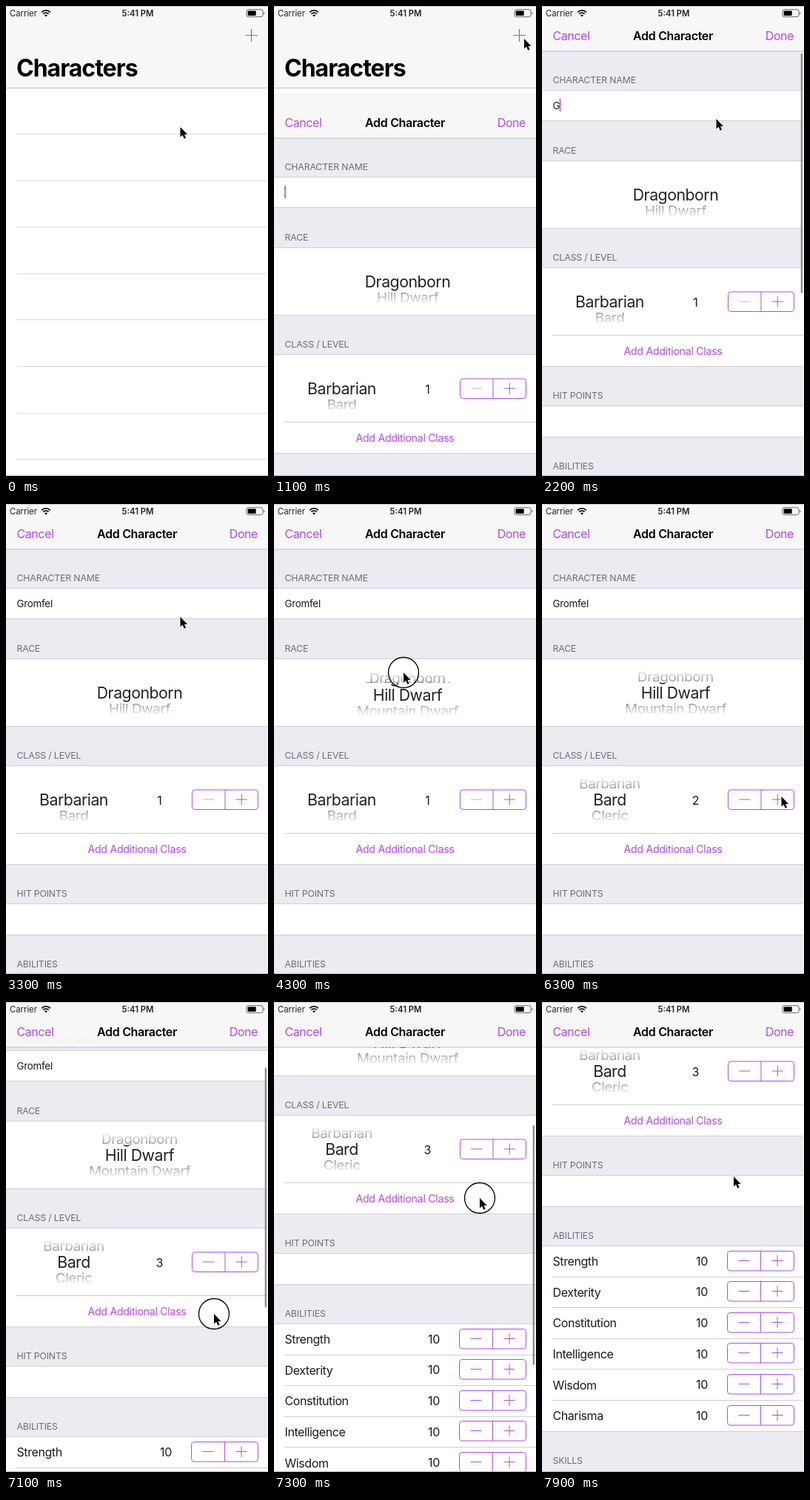
These frames come from a looping animation (354 by 633 pixels, 8 s). An HTML page:

```html
<!DOCTYPE html>
<html lang="en">
<head>
<meta charset="utf-8">
<title>Add Character</title>
<style>
  html, body { margin: 0; width: 100%; height: 100%; overflow: hidden; background: #fff; }
  svg { display: block; }
  text { font: 400 16px Inter, "Open Sans", sans-serif; letter-spacing: -.42px; fill: #1a1a1a; }
  text.status { font-size: 11.3px; letter-spacing: 0; fill: #222; }
  text.clock { font-weight: 600; }
  text.large { font-size: 32px; font-weight: 700; letter-spacing: -1px; fill: #000; }
  text.title { font-weight: 600; letter-spacing: -.33px; fill: #000; }
  text.action { fill: #b14ae6; }
  text.link { font-size: 14.2px; letter-spacing: -.29px; fill: #b14ae6; }
  text.head { font-size: 12.3px; letter-spacing: -.15px; fill: #6d6d72; }
  text.field { font-size: 13.3px; letter-spacing: -.2px; }
  text.wheel { font-size: 21.3px; letter-spacing: -.5px; fill: #222; }
  .tint { stroke: #b14ae6; fill: none; }
</style>
</head>
<body>
<script>
const W = 354, H = 633, LOOP = 8000, TICK = 100;
const NAME = 'Gromfel';

// Markup helpers
const rect = (x, y, w, h, fill, more = '') =>
  `<rect x="${x}" y="${y}" width="${w}" height="${h}" fill="${fill}" ${more}/>`;
const text = (x, y, str, cls = '', anchor = 'start', more = '') =>
  `<text x="${x}" y="${y}" class="${cls}" text-anchor="${anchor}" ${more}>${str}</text>`;
const line = (y, x = 0, color = '#d0d0d4') => rect(x, y, W - x, 1, color);
const band = (top, bottom) => rect(0, top, W, bottom - top, '#fff') + line(top) + line(bottom);
const header = (y, str) => text(14.5, y, str, 'head');

function stepper(x, cy, id = '') {
  const w = 340.5 - x, mid = x + w / 2, l = x + w / 4, r = x + w * 3 / 4;
  return `<g class="tint">
    <rect x="${x}" y="${cy - 13}" width="${w}" height="26.5" rx="3.8"/>
    <path d="M${mid} ${cy - 13}v26.5M${r - 7.5} ${cy}h15M${r} ${cy - 7.5}v15"/>
    <path ${id && `id="${id}"`} d="M${l - 7.5} ${cy}h15"/></g>`;
}

const fade = (id, from, to) =>
  `<linearGradient id="${id}" x1="0" x2="0" y1="${from}" y2="${to}">
    <stop stop-color="#fff" offset="0"/><stop stop-color="#fff" stop-opacity=".48" offset="1"/>
  </linearGradient>`;

// A wheel is a dimmed, foreshortened list with a sharp strip across its middle.
const STRIP = 13.5;
function wheel(id, cx, cy, items) {
  const rows = items.map(s => text(0, 7.7, s, 'wheel', 'middle')).join('');
  return `<g id="${id}" transform="translate(${cx} ${cy})">
    <g class="dim">${rows}</g>
    ${rect(-85, -45, 170, 45 - STRIP, 'url(#fadeTop)')}
    ${rect(-85, STRIP, 170, 45 - STRIP, 'url(#fadeBottom)')}
    ${rect(-85, -STRIP, 170, STRIP * 2, '#fff')}
    <g class="sharp" clip-path="url(#strip)">${rows}</g></g>`;
}

const abilities = ['Strength', 'Dexterity', 'Constitution', 'Intelligence', 'Wisdom', 'Charisma'];
const ROW = 41.6;

const listScreen = rect(0, 0, W, H, '#fff') + rect(0, 0, W, 110, '#f7f7f7') + line(110, 0, '#c4c4c6') +
  text(14, 95, 'Characters', 'large') +
  '<path class="tint" stroke-width="1.2" d="M323 39.5h17M331.5 31v17"/>' +
  Array.from({ length: 8 }, (_, i) => line(Math.round(172 + i * 62.6), 14, '#dcdcdc')).join('');

const form = band(113, 154) + band(208, 299) + band(352, 485) + band(538, 580) + band(633, 883) +
  header(104, 'CHARACTER NAME') + header(199, 'RACE') + header(343, 'CLASS / LEVEL') +
  header(529, 'HIT POINTS') + header(624, 'ABILITIES') + header(927, 'SKILLS') +
  text(14.5, 138.8, '', 'field', 'start', 'id="name"') +
  rect(14, 125, 1.6, 17, '#b14ae6', 'id="caret"') +
  wheel('race', 180.5, 254, ['Dragonborn', 'Hill Dwarf', 'Mountain Dwarf', 'High Elf']) +
  wheel('class', 91.5, 398.5, ['Barbarian', 'Bard', 'Cleric', 'Druid']) +
  text(207.3, 405, '1', '', 'middle', 'id="level"') + stepper(251.5, 398, 'minus') +
  line(443, 14) + text(177, 469.8, 'Add Additional Class', 'link', 'middle') +
  abilities.map((s, i) => {
    const y = 654.5 + i * ROW;
    return text(14.5, y + 5.6, s) + text(216, y + 5.3, '10', '', 'middle') +
      stepper(250.5, Math.round(y) - 1.5) + (i ? line(Math.round(633 + i * ROW), 14) : '');
  }).join('');

const sheet = rect(0, 0, W, H, '#ebebf1') + `<g id="form">${form}</g>` +
  rect(0, 0, W, 61, '#f7f7f7', 'fill-opacity=".975"') + line(60.5, 0, '#c0c0c2') +
  text(14.5, 45.5, 'Cancel', 'action') + text(177, 45.5, 'Add Character', 'title', 'middle') +
  text(340, 45.5, 'Done', 'action', 'end') +
  rect(349.7, 64, 2.3, 323, '#8a8a8e', 'rx="1.15" id="bar"');

const statusBar = text(5, 13.8, 'Carrier', 'status') + text(178, 13.8, '5:41 PM', 'status clock', 'middle') +
  `<g fill="none" stroke="#111" stroke-width="1.8">
    <path d="M48.2 8.4a8 8 0 0 1 11.6 0M50.3 10.7a5 5 0 0 1 7.4 0"/></g>
  <path d="M54 14.5l-2-2.1a2.9 2.9 0 0 1 4 0z" fill="#111"/>
  <rect x="325" y="4.8" width="22" height="9.8" rx="2.4" fill="none" stroke="#555" stroke-width=".9"/>` +
  rect(326.7, 6.5, 11, 6.4, '#000', 'rx=".8"') +
  '<path d="M348.3 8a2 2 0 0 1 0 3.6z" fill="#555"/>';

const pointer = `<g id="pointer">
  <circle id="touch" r="20.5" fill="#fff" fill-opacity=".2" stroke="#000" stroke-width="1.3"/>
  <path d="M0 0V13.6L3.1 10.7 5.3 15.7 7.6 14.7 5.5 9.9H9.6Z" stroke="#fff" stroke-width="1.6" paint-order="stroke"/></g>`;

document.body.innerHTML = `<svg width="${W}" height="${H}" viewBox="0 0 ${W} ${H}"><defs>
  <g>${fade('fadeTop', .42, 1)}${fade('fadeBottom', .58, 0)}</g>
  <clipPath id="strip"><rect x="-85" y="${-STRIP}" width="170" height="${STRIP * 2}"/></clipPath></defs>
  ${listScreen}<g id="sheet">${sheet}</g>${statusBar}${pointer}
  ${rect(0, 0, W, 1, '#cfcfcf')}${rect(0, H - 1, W, 1, '#b8b8b8')}</svg>`;

// Timeline: [ms, value...]
const tracks = {
  pointer: [[0, 235.5, 163], [100, 240, 157], [600, 335, 50], [700, 338, 44], [1200, 338, 44], [1400, 310, 75],
    [1700, 235.5, 152], [3300, 235.5, 152], [3700, 178, 255], [3900, 174, 258], [4100, 174, 243],
    [4300, 175, 227], [4500, 174, 225], [4900, 85, 418], [5100, 83, 420], [5400, 86, 388], [5600, 88, 386],
    [5900, 272, 392], [6100, 323.5, 394], [6500, 323.5, 394], [6700, 290, 512], [6900, 284, 480],
    [7000, 282, 474], [7100, 281, 420], [7200, 279, 338], [7300, 278, 264], [7400, 267, 244], [7600, 259, 235]],
  race: [[3900, 0], [4100, .35], [4300, .873], [4500, 1]],
  class: [[5100, 0], [5200, .3], [5400, .9], [5500, 1]],
  scroll: [[7000, 0], [7100, 48], [7200, 126], [7300, 200], [7400, 250], [7500, 280], [7600, 296], [7700, 305]],
  bar: [[1300, 0], [1400, 1], [2400, 1], [2700, 0], [6950, 0], [7000, 1], [7700, 1], [7900, 0]]
};
const touches = [[700, 900], [3900, 4500], [5000, 5500], [6100, 6300], [6500, 6600], [7000, 7400]];
const keys = [2200, 2500, 2600, 2800, 2900, 3100, 3200];

function at(track, t) {
  const i = track.findIndex(k => k[0] > t);
  if (i === 0) return track[0].slice(1);
  if (i < 0) return track[track.length - 1].slice(1);
  const a = track[i - 1], b = track[i], p = (t - a[0]) / (b[0] - a[0]);
  return a.slice(1).map((v, n) => v + (b[n + 1] - v) * p);
}

// Critically damped spring for the rising sheet
function sheetY(t) {
  const k = .01826 * (t - 930);
  return k <= 0 ? H : Math.round(H * (1 + k) * Math.exp(-k));
}

const $ = id => document.getElementById(id);
const shift = (el, x, y) => el.setAttribute('transform', `translate(${x} ${y})`);
const show = (el, v) => el.setAttribute('opacity', +v);

function turn(id, pos) {
  const [dim, sharp] = ['.dim', '.sharp'].map(s => $(id).querySelector(s).children);
  [...dim].forEach((el, i) => {
    const d = i - pos;
    el.setAttribute('transform', `translate(0 ${d * 21.6}) scale(.89 .8)`);
    show(el, Math.abs(d) < 1.5);
    shift(sharp[i], 0, d * 23.6);
  });
}

function draw(t) {
  const [scroll] = at(tracks.scroll, t);
  shift($('sheet'), 0, sheetY(t));
  shift($('form'), 0, -scroll);
  shift($('bar'), 0, scroll * .51);
  show($('bar'), at(tracks.bar, t)[0]);
  turn('race', at(tracks.race, t)[0]);
  turn('class', at(tracks.class, t)[0]);

  const name = $('name');
  name.textContent = NAME.slice(0, keys.filter(k => k <= t).length);
  const end = name.textContent ? name.getComputedTextLength() - .3 : 0;
  $('caret').setAttribute('x', 14.2 + end);
  show($('caret'), t < 3300 ? t < 1600 || t >= 2000 : t % 1000 >= 500);

  const level = 1 + (t >= 6200) + (t >= 6500);
  $('level').textContent = level;
  show($('minus'), level > 1 ? 1 : .5);

  shift($('pointer'), ...at(tracks.pointer, t));
  show($('touch'), touches.some(([a, b]) => t >= a && t < b));
}

const start = performance.now();
function frame() {
  const t = (performance.now() - start) % LOOP;
  draw(Math.floor(t / TICK) * TICK);
  requestAnimationFrame(frame);
}
frame();
</script>
</body>
</html>
```
